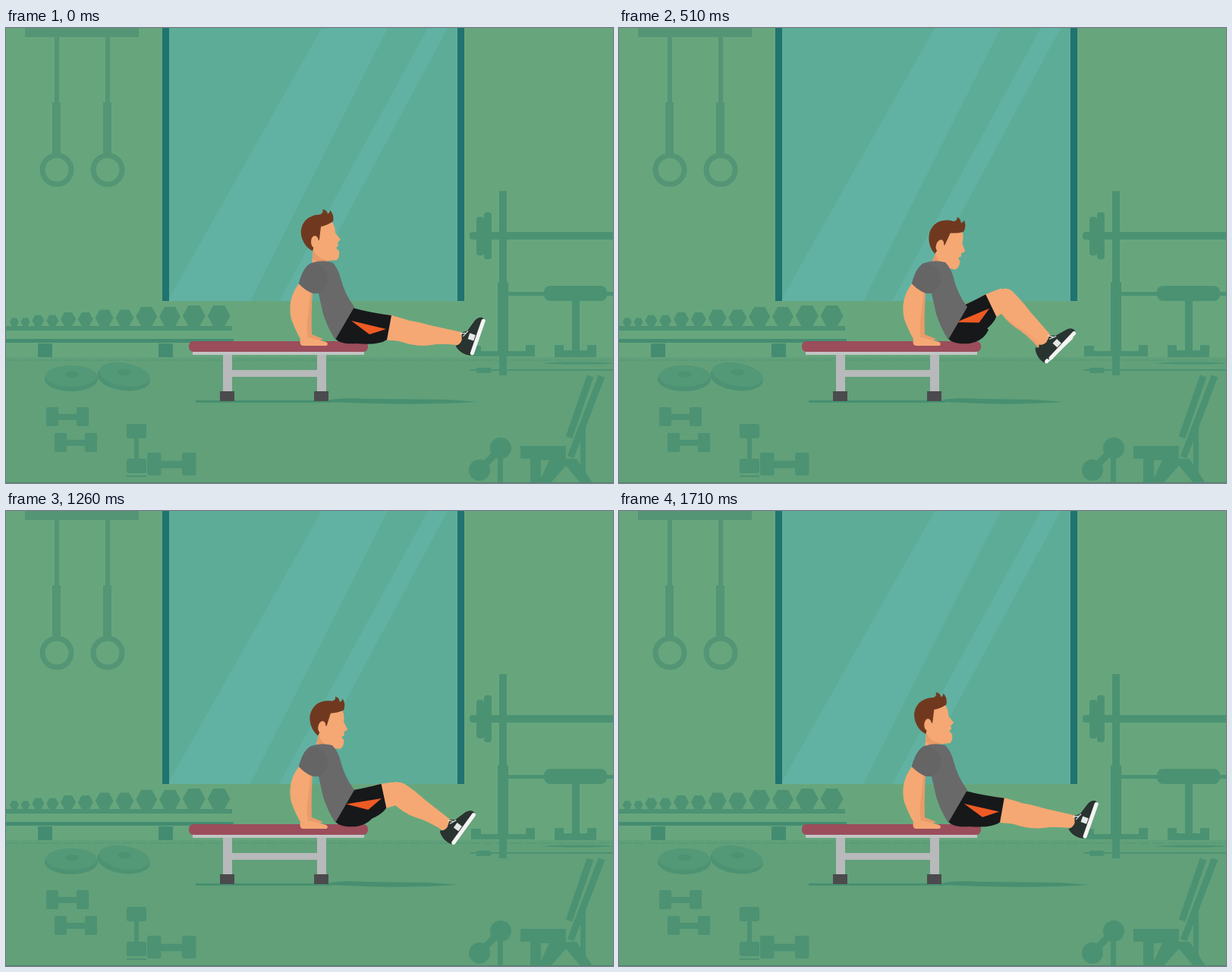
Animation of 800x600 px, one loop 1740 ms. Source, as an HTML page:

```html
<!DOCTYPE html>
<html lang="en">
<head>
<meta charset="utf-8">
<title>Bench leg tucks</title>
<style>
  html, body { margin: 0; width: 100%; height: 100%; overflow: hidden; background: #67a67d; }
  svg { display: block; width: 100vw; height: 100vh; }
</style>
</head>
<body>
<svg viewBox="0 0 800 600">
  <defs>
    <clipPath id="pane"><path d="M215 0H595V360H215Z"/></clipPath>
    <g id="dumbbell">
      <path d="M15 9H41V17H15Z"/>
      <rect width="16" height="25" rx="2"/><rect x="40" width="16" height="25" rx="2"/>
    </g>
    <g id="ring">
      <path d="M-3 12H3V100H-3ZM-6 98H5V168H-6Z"/>
      <circle cy="187" r="19" fill="none" stroke="#539574" stroke-width="7"/>
    </g>
    <!-- limb parts, each drawn from its own joint -->
    <path id="thigh" d="M40 -26L55 -24Q66 -21 76 -18L74 11Q60 9 45 8Z"/>
    <path id="calf" d="M0 -15Q15 -15 34 -12L76 -8 79 9Q52 9 36 14 18 18 0 14A14.5 14.5 0 0 1 0 -15Z"/>
    <g id="shoe" transform="translate(-18 21)">
      <path fill="#29332f" d="M1 -3C-2 -11 1 -21 6 -26Q10 -21 16 -21L25 -24 30 -18 46 -13Q54 -9 52 -3Z"/>
      <path fill="none" stroke="#f4f4f2" stroke-width="5" stroke-linecap="round" d="M4 -2.5H49"/>
      <path fill="none" stroke="#dfe5e2" stroke-width="1.2" d="M23 -26L27 -18M21 -21L30 -17"/>
      <path fill="#e4e8e6" d="M20 -14H28V-6H20Z"/>
    </g>
  </defs>

  <!-- room -->
  <path fill="#67a67d" d="M0 0H800V437H0Z"/>
  <path fill="#61a079" d="M0 434H800V600H0Z"/>
  <path stroke="#589b77" stroke-width="2" stroke-dasharray="16 3" d="M0 438H800"/>
  <path fill="#5cac98" d="M206 0H604V360H206Z"/>
  <g fill="#62b2a3" clip-path="url(#pane)">
    <path d="M416 0H503L322 360H213Z"/><path d="M556 0H582L389 360H360Z"/>
  </g>
  <path fill="#20736f" d="M206 0H215V360H206ZM595 0H604V360H595Z"/>

  <g fill="#539574">
    <path d="M25 0H175V12H25Z"/>
    <use href="#ring" x="67"/><use href="#ring" x="134"/>
  </g>

  <!-- dumbbell rack and loose weights -->
  <g fill="#4c9273">
    <path id="hexes"/>
    <path d="M0 393H298V399H0Z"/>
    <path fill="#448c71" d="M0 410H300V415H0ZM42 416H61V434H42ZM201 416H220V434H201Z"/>
    <ellipse cx="86" cy="463" rx="35" ry="16"/>
    <ellipse cx="155" cy="461" rx="35" ry="17" transform="rotate(8 155 461)"/>
    <g fill="#539877">
      <ellipse cx="86" cy="459" rx="34" ry="14"/>
      <ellipse cx="156" cy="457" rx="34" ry="15" transform="rotate(10 156 457)"/>
    </g>
    <ellipse cx="87" cy="457" rx="9" ry="4"/><ellipse cx="156" cy="454" rx="9" ry="4"/>
    <use href="#dumbbell" x="53" y="500"/><use href="#dumbbell" x="64" y="534"/>
    <use href="#dumbbell" transform="translate(186 560) scale(1.15 1.2)"/>
    <rect x="159" y="522" width="26" height="19" rx="3"/>
    <path d="M169 540H175V570H169ZM159 590H185V592H159Z"/>
    <rect x="159" y="568" width="26" height="19" rx="3"/>
  </g>

  <!-- barbell rack and machines -->
  <g fill="#4b9273">
    <path d="M650 215H660V458H650ZM648 335H662V430H648ZM615 269H800V279H615ZM660 348H800V353H660Z"/>
    <rect x="611" y="269" width="12" height="10" rx="4"/>
    <rect x="620" y="249" width="10" height="51" rx="4"/>
    <rect x="630" y="243" width="10" height="62" rx="4"/>
    <path d="M613 419H626V426H685V418H697V433H613Z"/>
    <rect x="709" y="340" width="83" height="20" rx="8"/>
    <path d="M746 359H756V425H766V418H778V434H723V418H735V425H746Z"/>
    <ellipse cx="755" cy="442" rx="46" ry="1.5"/>
    <path d="M612 450H800V452H612ZM620 448H638L641 451 638 455H620Z"/>
    <circle cx="652" cy="554" r="14"/><circle cx="624" cy="583" r="14"/>
    <path d="M648 560H655V600H648ZM757 520H764V600H757Z"/>
    <path d="M678 551H738V568H752L773 600H757L738 577 718 600H702L716 570H705V600H691V568H678Z"/>
    <path fill="none" stroke="#4b9273" stroke-width="9" d="M624 583L652 554M770 459L742 540M785 459L744 566"/>
  </g>
  <path fill="#4f8567" d="M0 599H800V600H0Z"/>

  <!-- bench -->
  <path fill="#478f70" d="M250 491H430V494H250Z"/>
  <path id="shadow" fill="#478f70"/>
  <path fill="#b8b9ba" d="M286 428H298V451H410V428H422V481H410V460H298V481H286Z"/>
  <path fill="#c3c4c4" d="M246 425H472V431H246Z"/>
  <path fill="#4b4b4d" d="M282 479H301V492H282ZM406 479H425V492H406Z"/>
  <rect x="241" y="413" width="236" height="14" rx="6" fill="#9b4d5b"/>

  <!-- athlete -->
  <g id="farLeg" fill="#f0a26f">
    <use href="#thigh"/>
    <g class="shin"><use href="#calf"/><g class="foot"><use href="#shoe"/></g></g>
  </g>
  <g id="nearLeg" fill="#f5a873">
    <use href="#thigh"/>
    <g class="shin"><use href="#calf"/><g class="foot"><use href="#shoe"/></g></g>
    <path fill="#17181a" d="M4 -34Q25 -28 55 -24L49 8Q38 16 7 13L-12 0Z"/>
  </g>
  <path fill="#17181a" d="M457 369L432 407Q438 418 462 416Q480 413 487 398L470 380Z"/>
  <path id="flash" fill="#ee5a24" d="M2 -17L48 -6 26 1Z"/>
  <g id="head">
    <path fill="#f5a873" d="M2 -20L23 -26Q27 -20 27 -12L34 -3 30 1 31 5 28 8 32 12Q33 21 29 24L17 25 18 32H-4L-2 6Z"/>
    <path fill="#e89a68" d="M-2 11Q4 23 17 24L16 26Q4 29 -3 22Z"/>
    <path fill="#70391f" d="M-3 12C-15 6 -21 -10 -17 -20C-14 -31 -2 -36 7 -36Q12 -38 10 -43Q16 -42 17 -37Q20 -38 20 -42Q26 -35 24 -27Q17 -22 8 -20L6 -3 0 3Z"/>
    <ellipse rx="5" ry="8" fill="#f5a873"/>
  </g>
  <path fill="#e99b69" d="M392 345L404 349Q402 380 403 404L418 410 405 416 392 400Z"/>
  <path fill="#f5a873" d="M386 337Q370 358 376 384Q382 400 388 410Q386 419 392 419H422Q426 417 422 414L398 408Q395 395 398 380Q400 364 401 349Z"/>
  <path fill="#69696a" d="M402 310Q415 305 430 309Q438 317 441 330Q446 350 459 368L434 411Q424 396 418 377L412 350 405 350Q394 346 386 337Q391 316 402 310Z"/>
  <path fill="#656566" d="M386 337Q391 316 402 310Q421 312 424 328Q425 344 411 350L405 350Q394 346 386 337Z"/>
</svg>

<script>
const LOOP = 1740, TUCKED = 690, STEP = 30;
const $ = id => document.getElementById(id);
const smooth = x => x * x * (3 - 2 * x);
const easeOut = (x, power) => 1 - (1 - x) ** power;
const lerp = (a, b, u) => a + (b - a) * u;

const HIP = [453, 403], CALF = 78;
const thighAngle = u => -38.8 * u;
const shinAngle = u => lerp(7, 51, u);

// Tuck amount per part, 0 stretched to 1 tucked: on the way in the head leads
// and the near shin lags; on the way out everything moves together.
function tuckAt(t) {
  if (t >= TUCKED) {
    const out = smooth(((LOOP - t) / (LOOP - TUCKED)) ** .75);
    return { head: out, thigh: out, farShin: out, nearShin: out };
  }
  const x = t / TUCKED, thigh = easeOut(x, 2);
  return { head: easeOut(x, 4), thigh, farShin: thigh, nearShin: smooth(x) };
}

function place(element, x, y, angle) {
  element.setAttribute('transform', `translate(${x} ${y}) rotate(${angle})`);
}

function poseLeg(leg, thigh, shin) {
  place(leg, ...HIP, thighAngle(thigh));
  place(leg.querySelector('.shin'), 71, -3, shinAngle(shin) - thighAngle(thigh));
  place(leg.querySelector('.foot'), CALF, 0, lerp(-78, -93, shin));
}

function draw(t) {
  const tuck = tuckAt(t);
  poseLeg($('farLeg'), tuck.thigh, tuck.farShin);
  poseLeg($('nearLeg'), tuck.thigh, tuck.nearShin);
  place($('flash'), ...HIP, thighAngle(tuck.thigh));
  place($('head'), lerp(407, 423, tuck.head), lerp(282, 287, tuck.head), lerp(0, 18, tuck.head));

  const end = lerp(621, 579, tuck.nearShin);
  $('shadow').setAttribute('d',
    `M425 491Q440 487 475 489L${end - 40} 490 ${end} 493Q${end - 60} 497 475 495L425 493Z`);
}

// Hexagonal weights stand side by side, growing in pairs.
let hexes = '', x = 2;
for (let i = 0; i < 12; i++) {
  const r = Math.min(6 + 2 * (i >> 1), 15), h = r * .9;
  x += r + 2.8;
  hexes += `M${x - r} ${393 - h}l${r / 2} ${-h}h${r}l${r / 2} ${h}l${-r / 2} ${h}h${-r}Z`;
  x += r;
}
$('hexes').setAttribute('d', hexes);

const start = performance.now();
function frame() {
  const t = (performance.now() - start) % LOOP;
  draw(t < 2 * STEP ? 0 : Math.floor(t / STEP) * STEP);
  requestAnimationFrame(frame);
}
frame();
</script>
</body>
</html>
```
